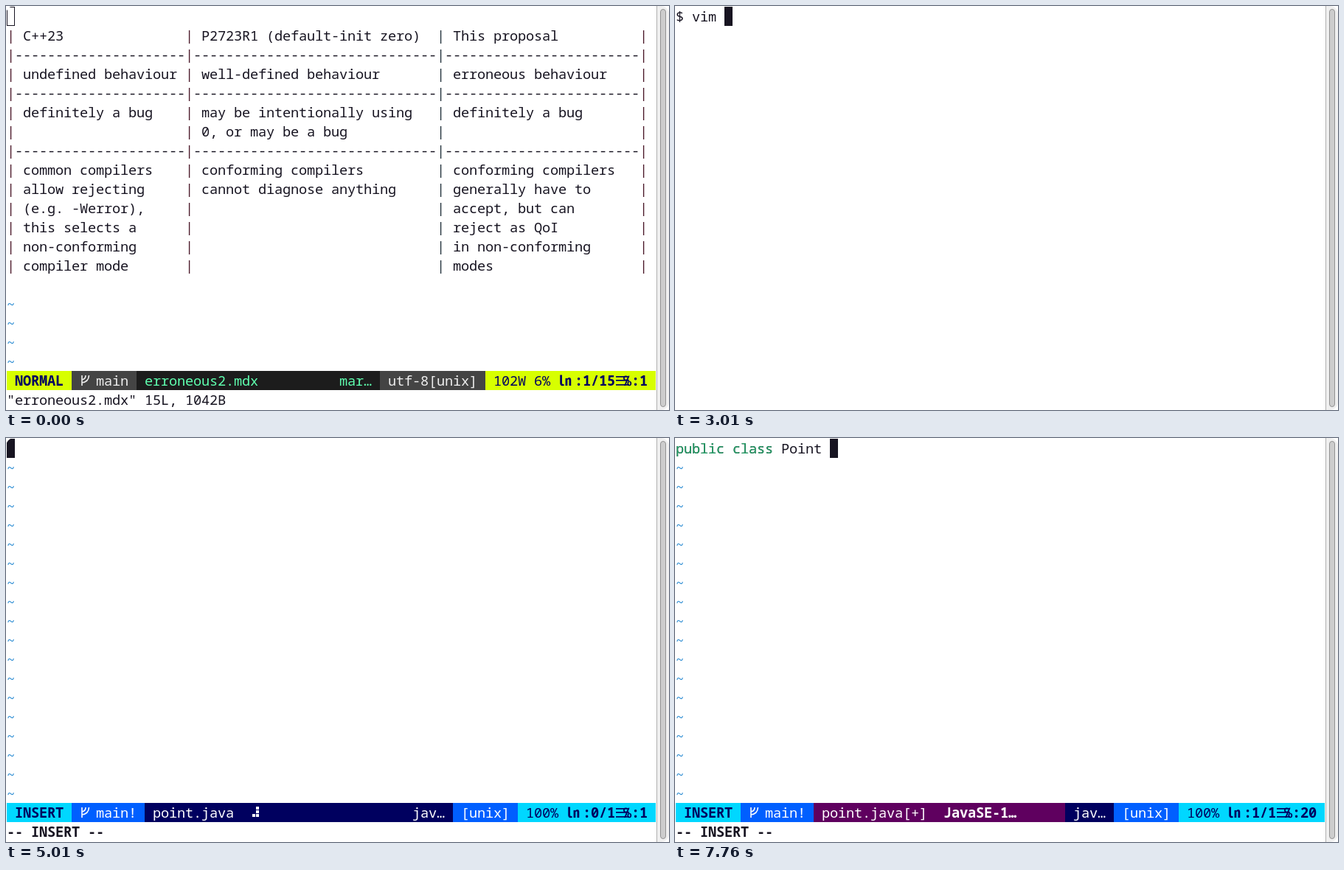
Animation of 899x548 px, one loop 8 s. Source, as an HTML page with a canvas:

```html
<!DOCTYPE html>
<html lang="en">
<head>
<meta charset="utf-8">
<title>Terminal session</title>
<style>
  html, body { margin: 0; width: 100%; height: 100%; overflow: hidden; background: #fff; }
  canvas { display: block; }
</style>
</head>
<body>
<canvas id="stage" width="899" height="548"></canvas>
<script>
const ctx = document.getElementById('stage').getContext('2d');
const COLS = 80, CELL_W = 11, CELL_H = 26, LOOP = 8000;
const INK = '#171421', NAVY = '#00005f', GREEN = '#26a269', TILDE = '#2a8bd2';
const BAR = '#4a1828', INNER_BAR = '#20303a';
const FONT = '18.667px "Noto Sans Mono", "Noto Sans CJK JP", "DejaVu Sans Mono", monospace';

const THEMES = {
  NORMAL:  { mode: '#d7ff00', side: '#444444', sideInk: '#eeeeee', mid: '#1c1c1c', midInk: '#5fffaf' },
  COMMAND: { mode: '#00d700', side: '#444444', sideInk: '#eeeeee', mid: '#1c1c1c', midInk: '#5fffaf' },
  INSERT:  { mode: '#00d7ff', side: '#005fff', sideInk: '#ffffff', mid: NAVY, midInk: '#ffffff' }
};

const RULE = null;
const TABLE = [
  ['C++23', 'P2723R1 (default-init zero)', 'This proposal'],
  RULE,
  ['undefined behaviour', 'well-defined behaviour', 'erroneous behaviour'],
  RULE,
  ['definitely a bug', 'may be intentionally using', 'definitely a bug'],
  ['', '0, or may be a bug', ''],
  RULE,
  ['common compilers', 'conforming compilers', 'conforming compilers'],
  ['allow rejecting', 'cannot diagnose anything', 'generally have to'],
  ['(e.g. -Werror),', '', 'accept, but can'],
  ['this selects a', '', 'reject as QoI'],
  ['non-conforming', '', 'in non-conforming'],
  ['compiler mode', '', 'modes']
];
const BAR_COLS = [0, 22, 53, 78];

// Braille dot numbers lit in each spinner phase
const SPINNER = ['124', '145', '1456', '456', '3456', '356', '236', '1236', '123', '1234'];

const cellX = col => 1 + col * CELL_W;
const cellY = row => 1 + row * CELL_H;

function fill(row, col, width, color) {
  ctx.fillStyle = color;
  ctx.fillRect(cellX(col), cellY(row), width * CELL_W, CELL_H);
}

function drawBranch(x, y, color) {
  ctx.strokeStyle = color;
  ctx.lineWidth = 1.6;
  ctx.beginPath();
  ctx.moveTo(x + 3, y + 6);
  ctx.lineTo(x + 3, y + 20);
  ctx.moveTo(x + 3, y + 12);
  ctx.quadraticCurveTo(x + 8, y + 11, x + 8, y + 6);
  ctx.moveTo(x + 3, y + 16);
  ctx.quadraticCurveTo(x + 12, y + 15, x + 12.5, y + 6);
  ctx.stroke();
}

function drawMenu(x, y, color) {
  ctx.fillStyle = color;
  for (const dy of [7, 12, 18]) ctx.fillRect(x + 1, y + dy, 18, 1.7);
}

function drawSpinner(row, col, phase) {
  ctx.fillStyle = '#fff';
  for (const dot of SPINNER[phase % 10]) {
    const i = dot - 1;
    ctx.fillRect(cellX(col) + 3 + (i > 2 ? 5 : 0), cellY(row) + 5 + i % 3 * 5, 4, 4);
  }
}

function put(row, col, text, color = INK, bold = false) {
  ctx.font = (bold ? 'bold ' : '') + FONT;
  [...text].forEach((ch, i) => {
    const x = cellX(col + i), y = cellY(row);
    ctx.fillStyle = color;
    if (ch === 'ᚠ') drawBranch(x, y, color);
    else if (ch === '☰') drawMenu(x, y, color);
    else if (ch !== ' ') ctx.fillText(ch, x, y + 20);
  });
}

function segments(col, list) {
  for (const [text, bg, ink, bold] of list) {
    fill(19, col, text.length, bg);
    put(19, col, text, ink, bold);
    col += text.length;
  }
}

function statusLine({ mode, branch, file, type, encoding, size, place, modified }) {
  const t = THEMES[mode], mid = modified ? '#5f005f' : t.mid;
  const right = [
    [` ${type} `, t.mid, t.midInk],
    [` ${encoding} `, t.side, t.sideInk],
    [` ${size} `, t.mode, NAVY],
    [`㏑ :${place} `, t.mode, NAVY, true]
  ];
  const width = right.reduce((sum, [text]) => sum + text.length, 0);
  fill(19, 0, COLS, mid);
  segments(0, [
    [` ${mode} `, t.mode, NAVY, true],
    [` ᚠ ${branch} `, t.side, t.sideInk],
    [` ${file}`, mid, t.midInk]
  ]);
  segments(COLS - width, right);
}

function tildes(first) {
  for (let row = first; row < 19; row++) put(row, 0, '~', TILDE);
}

function tableScreen(step) {
  TABLE.forEach((cells, i) => {
    BAR_COLS.forEach((col, j) => {
      put(i + 1, col, '|', j === 2 ? INNER_BAR : BAR);
      if (j === 3) return;
      if (cells) put(i + 1, col + 2, cells[j]);
      else put(i + 1, col + 1, '-'.repeat(BAR_COLS[j + 1] - col - 1));
    });
  });
  tildes(15);
  const command = step === 5;
  statusLine({
    mode: command ? 'COMMAND' : 'NORMAL', branch: step < 2 ? 'main' : 'main!',
    file: 'erroneous2.mdx', type: 'mar…', encoding: 'utf-8[unix]',
    size: '102W 6%', place: '1/15☰℅:1'
  });
  if (command) {
    fill(20, 0, 1, INK);
    put(20, 0, ':', '#fff');
    put(20, 1, 'q');
    return;
  }
  put(20, 0, '"erroneous2.mdx" 15L, 1042B');
  if (step) fill(0, 0, 1, INK);
  else {
    ctx.strokeStyle = INK;
    ctx.lineWidth = 1;
    ctx.strokeRect(1.5, 1.5, CELL_W - 1, CELL_H - 1);
  }
}

function shellScreen(history, command, typed, cursor) {
  const row = history.length;
  history.forEach((line, i) => put(i, 0, '$ ' + line));
  const text = '$ ' + command.slice(0, typed);
  put(row, 0, text);
  if (cursor) fill(row, text.length, 1, INK);
}

function editorScreen(step) {
  const typing = step - 20, insert = typing >= 0;
  const count = !insert ? 0 : typing <= 6 ? typing * 2 : Math.round(12 + (typing - 6) * 1.4);
  const modified = count > 0;
  const text = 'public class Point '.slice(0, count);
  put(0, 0, text);
  if (count >= 6) put(0, 0, 'public', GREEN);
  if (count >= 12) put(0, 7, 'class', GREEN);
  fill(0, count, 1, INK);
  tildes(1);
  statusLine({
    mode: insert ? 'INSERT' : 'NORMAL', branch: 'main!',
    file: 'point.java' + (modified ? '[+]' : ''), type: 'jav…', encoding: '[unix]',
    size: '100%', place: `${+modified}/1☰℅:${count + 1}`, modified
  });
  if (!insert) {
    put(20, 0, '"point.java" [New]');
    return;
  }
  put(20, 0, '-- INSERT --', INK, true);
  const col = modified ? 33 : 30;
  if (step >= 30) put(19, col, 'JavaSE-1…', '#fff', true);
  else {
    drawSpinner(19, col, 4 + Math.floor(typing * 2.5));
    if (step >= 24) put(19, col + 2, 'Openin…', '#fff', true);
  }
}

function scrollbar() {
  ctx.fillStyle = '#f0f0f0';
  ctx.fillRect(883, 0, 16, 548);
  ctx.fillStyle = '#b0b0b0';
  ctx.fillRect(882, 0, 1, 548);
  ctx.beginPath();
  ctx.roundRect(887.5, 4.5, 7, 539, 3.5);
  ctx.fillStyle = '#cdcdcd';
  ctx.fill();
  ctx.strokeStyle = '#929292';
  ctx.lineWidth = 1;
  ctx.stroke();
}

function draw(time) {
  const t = time % LOOP;
  const step = Math.floor((t < 2000 ? t : t - 10) / 250);
  ctx.fillStyle = '#fff';
  ctx.fillRect(0, 0, 899, 548);
  ctx.save();
  ctx.beginPath();
  ctx.roundRect(0, 0, 899, 548, 11);
  ctx.clip();
  scrollbar();
  if (step < 6) tableScreen(step);
  else if (step < 10) shellScreen(['vim c++-uninit.cc', 'vim erroneous.mdx', 'vim erroneous2.mdx'], 'clear', (step - 6) * 2, true);
  else if (step < 18) shellScreen([], 'vim point.java', (step - 10) * 2, step < 17);
  else editorScreen(step);
  ctx.restore();
}

const start = performance.now();
function tick() {
  draw(performance.now() - start);
  requestAnimationFrame(tick);
}
tick();
</script>
</body>
</html>
```
